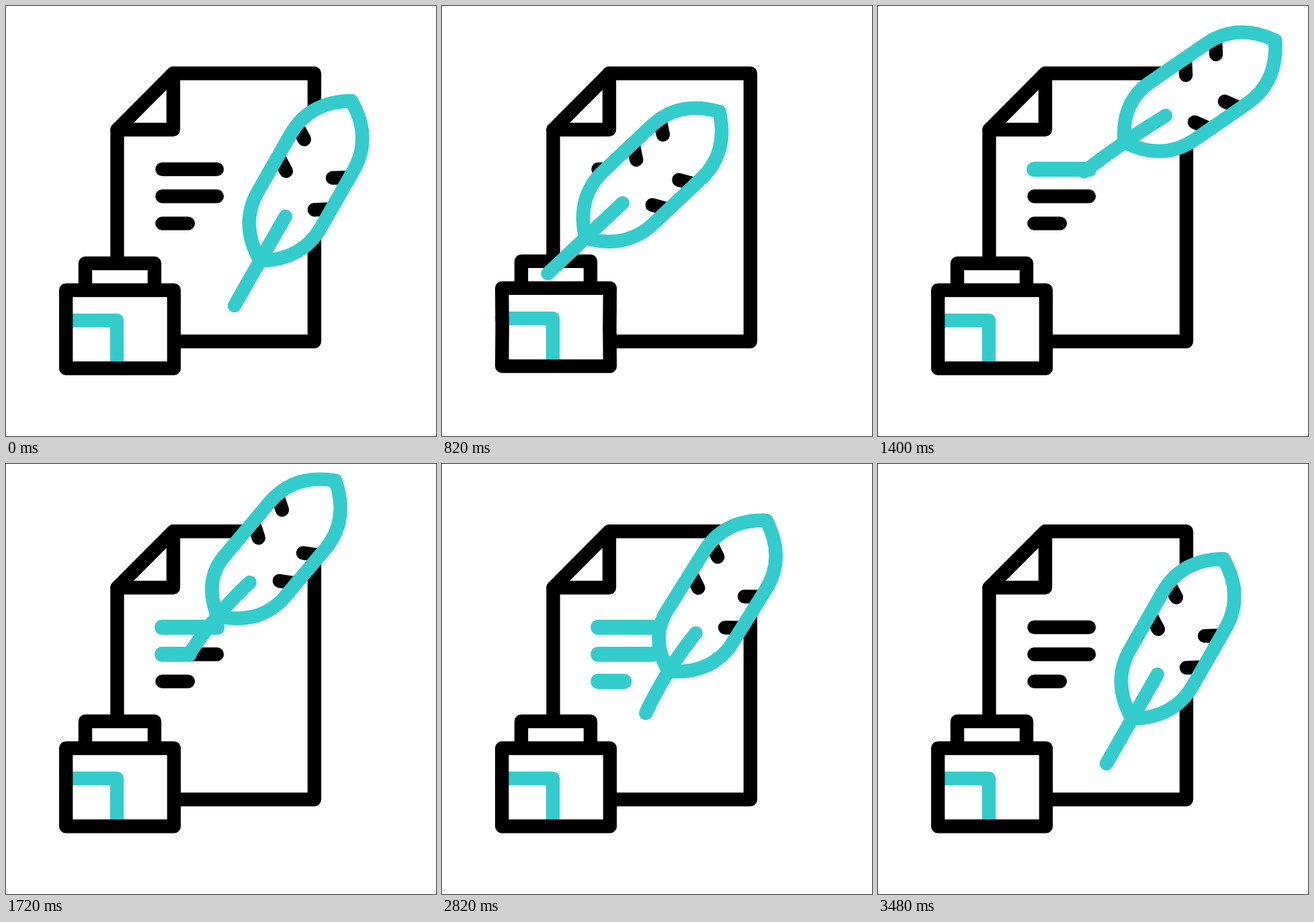
Write an HTML page with a canvas that moves like this. It is 640x640 px and loops after 3560 ms.

```html
<!DOCTYPE html>
<html lang="en">
<head>
<meta charset="utf-8">
<title>Quill and ink</title>
<style>
html, body { margin: 0; width: 100%; height: 100%; overflow: hidden; background: #fff; }
canvas { display: block; width: 640px; height: 640px; }
</style>
</head>
<body>
<canvas id="stage" width="640" height="640"></canvas>
<script>
const ctx = document.getElementById('stage').getContext('2d');
const LOOP = 3560, STEP = 20;
const INK = '#000', TEAL = '#33cccc', PAPER = '#fff', WEIGHT = 20.4;
const SHAFT = 153, MAX_FLEX = 24;
const LEAVE = 160, DIP = 755, RETURNED = 3340;
const LINE_X = 232.5, MS_PER_PX = 3;

const clamp = (v, lo = 0, hi = 1) => Math.min(hi, Math.max(lo, v));
const progress = (t, from, to) => clamp((t - from) / (to - from));
const mix = (a, b, u) => a + (b - a) * u;
const linear = u => u;
const smooth = u => u * u * (3 - 2 * u);

const rest = { x: 340, y: 446, angle: 60.25 };
const inkwell = { x: 142, y: 430, angle: 43.8 };

const lines = [
  { end: 314, from: 1136, angles: [41, 33.5] },
  { end: 314, from: 1600, angles: [45, 55] },
  { end: 271, from: 2228, angles: [56.4, 56] }
].map((line, i) => ({
  ...line,
  y: 243 + 40.3 * i,
  to: line.from + (line.end - LINE_X) * MS_PER_PX
}));
const firstStroke = lines[0].from, lastStroke = lines[2].to;

// Each leg carries the nib to a pose by a given time
const legs = [
  { by: LEAVE, pose: rest },
  { by: DIP, pose: inkwell, lift: 108, ease: smooth },
  ...lines.flatMap(({ end, from, to, y, angles: [a, b] }) => [
    { by: from, pose: { x: LINE_X, y, angle: a } },
    { by: to, pose: { x: end, y, angle: b } }
  ]),
  { by: RETURNED, pose: rest, lift: 10, ease: smooth }
];

function quillPose(t) {
  const i = legs.findIndex(leg => t < leg.by);
  if (i < 1) return rest;
  const { by, pose, lift = 0, ease = linear } = legs[i];
  const last = legs[i - 1];
  const u = ease(progress(t, last.by, by));
  return {
    x: mix(last.pose.x, pose.x, u),
    y: mix(last.pose.y, pose.y, u) - lift * 4 * u * (1 - u),
    angle: mix(last.pose.angle, pose.angle, u)
  };
}

// Pressure builds while writing and relaxes on the way back
const quillFlex = t => MAX_FLEX
  * Math.min(progress(t, firstStroke, lines[2].from), progress(t, RETURNED, lastStroke));

const potHop = t => -7.2 * Math.sin(Math.PI * progress(t, 740, 1300));

function stroke(color, width = WEIGHT) {
  ctx.strokeStyle = color;
  ctx.lineWidth = width;
  ctx.stroke();
}

function trace(points, closed) {
  ctx.beginPath();
  points.forEach(([x, y]) => ctx.lineTo(x, y));
  if (closed) ctx.closePath();
}

function drawPaper() {
  trace([[459, 100.3], [249, 100.3], [165.5, 184], [165.5, 499.2], [459, 499.2]], true);
  stroke(INK);
  trace([[249, 100.3], [249, 184], [165.5, 184]]);
  stroke(INK);
}

function drawLines(t) {
  for (const { y, end, from, to } of lines) {
    trace([[LINE_X, y], [end, y]]);
    stroke(INK);
    if (t < from) continue;
    trace([[LINE_X, y], [mix(LINE_X, end, progress(t, from, to)), y]]);
    ctx.globalAlpha = progress(t, RETURNED, RETURNED - 400);
    stroke(TEAL, 22.6);
    ctx.globalAlpha = 1;
  }
}

function potBody(bow) {
  const left = 89.2, right = 250, top = 423, bottom = 539.2, middle = (top + bottom) / 2;
  ctx.beginPath();
  ctx.moveTo(left, top);
  ctx.lineTo(right, top);
  ctx.quadraticCurveTo(right - bow, middle, right, bottom);
  ctx.lineTo(left, bottom);
  ctx.quadraticCurveTo(left + bow, middle, left, top);
  ctx.closePath();
}

function drawPot(dy) {
  const bow = -dy * 0.3;
  ctx.save();
  ctx.translate(0, dy);
  ctx.fillStyle = PAPER;
  trace([[118, 423], [118, 383], [221, 383], [221, 423]]);
  ctx.fill();
  stroke(INK);
  potBody(bow);
  ctx.fill();
  trace([[89, 468], [165, 468], [165, 539]]);
  stroke(TEAL);
  potBody(bow);
  stroke(INK);
  ctx.restore();
}

function vanePath(bend) {
  const curve = (a, b) => ctx.quadraticCurveTo(...bend(...a), ...bend(...b));
  const half = 54, root = 77, tip = 351, low = 165, high = 263;
  ctx.beginPath();
  ctx.moveTo(...bend(root, 0));
  curve([109, half], [low, half]);
  ctx.lineTo(...bend(high, half));
  curve([319, half], [tip, 0]);
  curve([319, -half], [high, -half]);
  ctx.lineTo(...bend(low, -half));
  curve([109, -half], [root, 0]);
  ctx.closePath();
}

function drawQuill({ x, y, angle }, flex) {
  // The lower shaft shortens and bows under pressure
  const bend = (s, p) => {
    const u = clamp((SHAFT - s) / SHAFT);
    return [s - flex * (1 - u), p - flex / 3 * 4 * u * (1 - u)];
  };
  ctx.save();
  ctx.translate(x, y);
  ctx.rotate(-angle * Math.PI / 180);
  vanePath(bend);
  ctx.fillStyle = PAPER;
  ctx.fill();
  for (const side of [-1, 1]) {
    for (const pair of [0, 1]) {
      const s = 197.5 - 14.5 * side + 54.5 * pair;
      trace([bend(s, 32.5 * side), bend(s + 12, 52 * side)]);
      stroke(INK);
    }
  }
  vanePath(bend);
  stroke(TEAL);
  ctx.beginPath();
  ctx.moveTo(0, 0);
  ctx.quadraticCurveTo((SHAFT - flex) / 2, -flex * 2 / 3, SHAFT - flex, 0);
  stroke(TEAL);
  ctx.restore();
}

function draw(t) {
  ctx.fillStyle = PAPER;
  ctx.fillRect(0, 0, 640, 640);
  ctx.lineCap = ctx.lineJoin = 'round';
  drawPaper();
  drawLines(t);
  drawPot(potHop(t));
  drawQuill(quillPose(t), quillFlex(t));
}

const start = performance.now();
function tick() {
  const t = (performance.now() - start) % LOOP;
  draw(t - t % STEP);
  requestAnimationFrame(tick);
}
tick();
</script>
</body>
</html>
```
